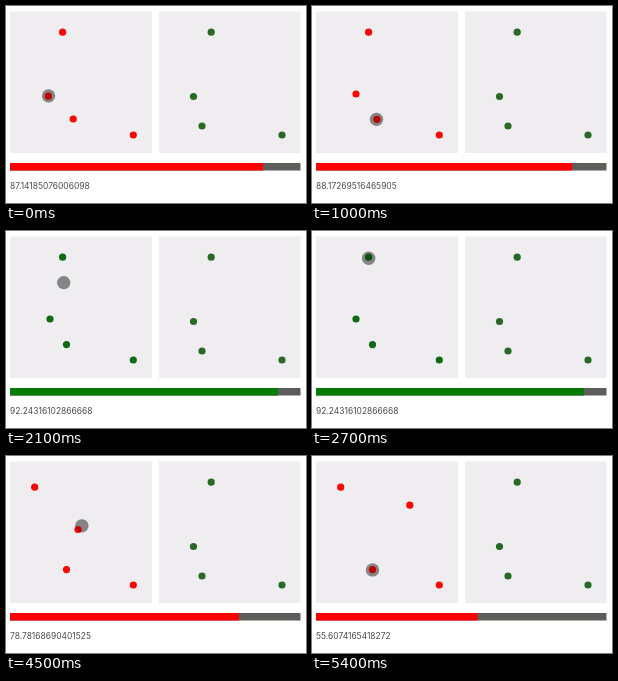
These frames come from a looping animation (300 by 197 pixels, 5600 ms). An HTML page:

```html
<!DOCTYPE html>
<html lang="en">
<head>
<meta charset="utf-8">
<title>Match the points</title>
<style>
  html, body { margin: 0; width: 100%; height: 100%; overflow: hidden; background: #fff; }
  svg { display: block; width: 100%; height: 100%; }
  .panel { fill: #efedf0; }
  .goal { fill: #286a25; }
  .pointer { fill: #000; fill-opacity: .25; }
  #score { font: 8.45px Inter, sans-serif; fill: #4a4a47; }
</style>
</head>
<body>
<svg viewBox="0 0 300 197">
  <rect class="panel" x="4" y="5.5" width="142" height="141.5"/>
  <rect class="panel" x="153" y="5.5" width="141.6" height="141.5"/>
  <g class="goal">
    <circle cx="205.2" cy="26.2" r="3.6"/>
    <circle cx="187.5" cy="90.5" r="3.6"/>
    <circle cx="196" cy="120" r="3.6"/>
    <circle cx="276" cy="129" r="3.6"/>
  </g>
  <!-- The translucent pointer surrounds the dots: one half below, one above. -->
  <circle class="pointer" r="6.7"/>
  <g id="dots"></g>
  <circle class="pointer" r="6.7"/>
  <rect x="4" y="157" width="290.5" height="7.5" fill="#5d5e5a"/>
  <rect id="bar" x="4" y="157" height="7.5"/>
  <text id="score" x="4" y="182.6"></text>
</svg>
<script>
const LOOP = 5600, STEP = 100, LAST = 5400;
const MATCH_START = 1300, MATCH_END = 3300, FADE = 220;
const TRAVEL = 1400;  // longest pointer move between two drags
const LEAD = 45;      // how far the pointer runs ahead of a dragged dot
const RED = [255, 0, 0], GREEN = [5, 122, 5];

const home = [[56.6, 26.2], [42.3, 90.2], [67.2, 113], [127.3, 129]];
const homeScore = 87.14185076006098;
const drags = [
  { dot: 1, start: 0, end: 300, to: [44, 88], score: 86.14248595238094 },
  { dot: 2, start: 800, end: 1400, to: [60.5, 113.9], score: 92.23311358921524 },
  { dot: 2, start: 1400, end: 1500, to: [60.5, 113.6], score: 92.24316102866668 },
  { dot: 0, start: 3200, end: 3600, to: [31, 30.5], score: 90.26381017247998 },
  { dot: 0, start: 3600, end: 3800, to: [28.7, 31.2], score: 90.10472953186402 },
  { dot: 1, start: 4300, end: 4500, to: [72, 73.5], score: 78.78168690401525 },
  { dot: 1, start: 4500, end: 4800, to: [97.8, 49.2], score: 55.6074165418272 },
  { dot: 2, start: 5400, end: LOOP, to: [60.5, 115], score: 55.6074165418272 }
];

const clamp = u => Math.min(1, Math.max(0, u));
const mix = (a, b, u) => a * (1 - u) + b * u;
const mixAll = (a, b, u) => a.map((v, i) => mix(v, b[i], u));
const easeOut = u => 1 - (1 - u) ** 2;

function stateAt(t) {
  const points = [...home];
  let score = homeScore, pointer = home[1], free = 0;
  for (const { dot, start, end, to, score: endScore } of drags) {
    if (t < start) {
      const u = clamp((t - free) / Math.min(TRAVEL, start - free));
      pointer = mixAll(pointer, points[dot], easeOut(u));
      break;
    }
    const u = clamp((t - start) / (end - start));
    pointer = points[dot] = mixAll(points[dot], to, u);
    score = mix(score, endScore, u);
    if (t < end) break;
    free = end;
  }
  return { points, score, pointer };
}

const $ = id => document.getElementById(id);
const bar = $('bar'), label = $('score'), group = $('dots');
const pointers = document.querySelectorAll('.pointer');
const dots = home.map(() => {
  const dot = document.createElementNS(group.namespaceURI, 'circle');
  dot.setAttribute('r', 3.6);
  return group.appendChild(dot);
});

function place(circle, [x, y]) {
  circle.setAttribute('cx', x);
  circle.setAttribute('cy', y);
}

function barColor(t) {
  const u = clamp((t - MATCH_START) / FADE) - clamp((t - MATCH_END) / FADE);
  return `rgb(${mixAll(RED, GREEN, u).map(Math.round)})`;
}

function draw(t) {
  const { points, score } = stateAt(t);
  const { pointer } = stateAt(t + LEAD);
  const matched = t >= MATCH_START && t <= MATCH_END;
  dots.forEach((dot, i) => place(dot, points[i]));
  pointers.forEach(half => place(half, pointer));
  group.setAttribute('fill', matched ? '#106a14' : '#f90505');
  bar.setAttribute('width', 290.5 * score / 100);
  bar.setAttribute('fill', barColor(t));
  label.textContent = score;
}

const begin = performance.now();
let shown = -1;
function tick() {
  const elapsed = (performance.now() - begin) % LOOP;
  const t = Math.min(LAST, Math.floor(elapsed / STEP) * STEP);
  if (t !== shown) draw(shown = t);
  requestAnimationFrame(tick);
}
tick();
</script>
</body>
</html>
```
